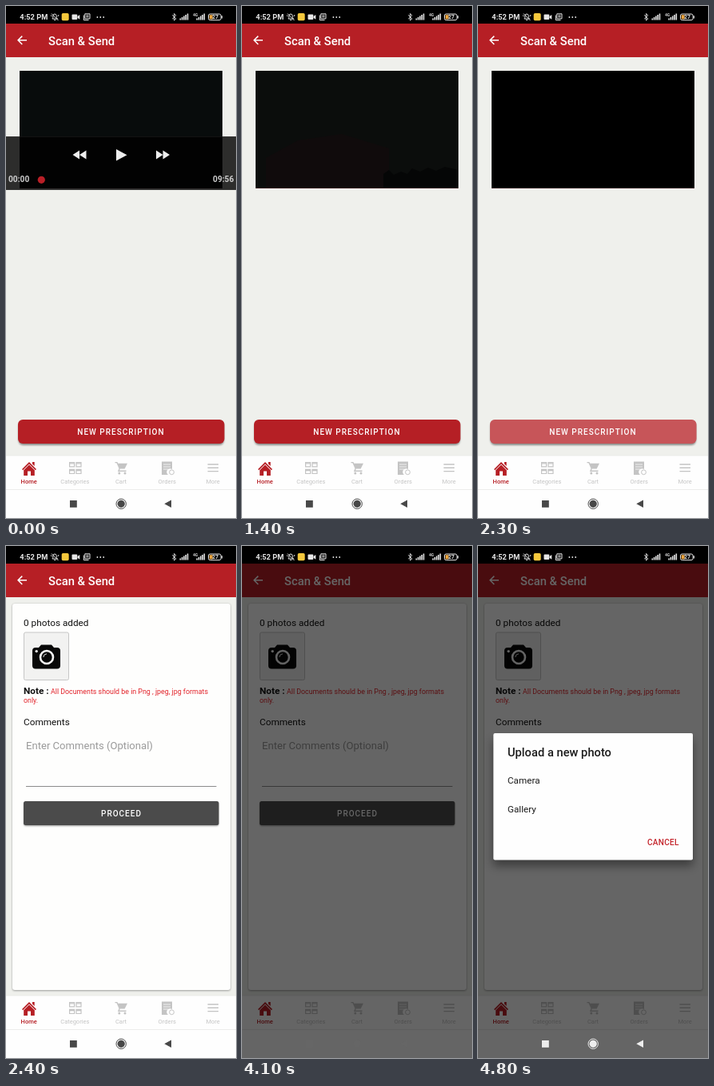
These frames come from a looping animation (288 by 640 pixels, 5000 ms). An HTML page:

```html
<!DOCTYPE html>
<html lang="en">
<head>
<meta charset="utf-8">
<title>Scan &amp; Send</title>
<style>
html, body { margin: 0; width: 100%; height: 100%; overflow: hidden; background: #eff0ec; }
svg { display: block; width: 288px; height: 640px; font-family: Roboto, Inter, sans-serif; }
.m { font-weight: 500; }
.b { font-weight: 700; }
.tab { font-size: 7.5px; text-anchor: middle; }
.line { fill: none; stroke: currentColor; }
</style>
</head>
<body>
<svg viewBox="0 0 288 640" xmlns="http://www.w3.org/2000/svg">
  <defs>
    <filter id="soft" x="-20%" y="-20%" width="140%" height="150%"><feGaussianBlur stdDeviation="1.3"/></filter>
    <filter id="deep" x="-20%" y="-20%" width="140%" height="150%"><feGaussianBlur stdDeviation="6"/></filter>
    <clipPath id="buttonShape"><rect x="15" y="517" width="258.5" height="30" rx="6"/></clipPath>
    <path id="skip" d="M0 0L8.5 5.5L0 11ZM8.5 0L17 5.5L8.5 11Z"/>
    <path id="signal" d="M0 8v-2h1.6v2zM2.3 8V4.5h1.6V8zM4.6 8V3h1.6v5zM6.9 8V1.5h1.6V8zM9.2 8V0h1.6v8z"/>
  </defs>

  <rect width="288" height="640" fill="#eff0ec"/>

  <g id="scanPage">
    <rect x="17" y="81" width="254" height="147" fill="#080c0c"/>
    <g id="scene">
      <rect x="17" y="81" width="254" height="147" fill="#0b0d0c"/>
      <path d="M30 227V190L70 168L125 160L184 178V227Z" fill="#150b0c" opacity=".6"/>
      <path d="M177 227V210L184 205L190 211L199 207L207 210L213 203L223 207L233 202L243 206L254 201L271 205V227Z" fill="#050606"/>
    </g>
    <rect id="blackout" x="17" y="81" width="254" height="147"/>
    <path d="M17 227.5H271" stroke="#321419"/>
    <g id="controls">
      <rect y="163" width="288" height="67" opacity=".81"/>
      <path d="M0 163.5H288M0 229.5H288" stroke="#555" stroke-width=".6" opacity=".35"/>
      <g fill="#eee">
        <use href="#skip" transform="translate(100.5 180.5) scale(-1 1)"/>
        <path d="M138 179L151.5 186.3L138 193.5Z"/>
        <use href="#skip" x="188" y="180.5"/>
      </g>
      <g class="b" font-size="10.2" fill="#ccc">
        <text x="3" y="220">00:00</text>
        <text x="285.3" y="220" text-anchor="end">09:56</text>
      </g>
      <circle cx="44.3" cy="217.3" r="4.6" fill="#b91f27"/>
    </g>
    <rect x="15.5" y="519" width="257.5" height="30" rx="6" opacity=".42" filter="url(#soft)"/>
    <rect x="15" y="517" width="258.5" height="30" rx="6" fill="#b51f25"/>
    <g clip-path="url(#buttonShape)"><circle id="ripple" cx="144" cy="532" fill="#fff" opacity=".24"/></g>
    <text class="m" x="89.3" y="536" font-size="10" letter-spacing="1" fill="#fff">NEW PRESCRIPTION</text>
  </g>

  <g id="formPage">
    <rect x="8" y="72.5" width="273" height="483.5" rx="3" opacity=".35" filter="url(#soft)"/>
    <rect x="8" y="72" width="273" height="483" rx="3" fill="#fefefd"/>
    <g font-size="11.8" fill="#111">
      <text x="22" y="100">0 photos added</text>
      <text class="b" x="22" y="185">Note :</text>
      <text x="22" y="223.5">Comments</text>
    </g>
    <rect x="22.5" y="108" width="56" height="59.5" rx="2" fill="#f2f2f1" stroke="#c6c6c6"/>
    <path d="M37 127H41L44 123.5H57L60 127H64Q68 127 68 131V149.5Q68 153.5 64 153.5H37Q33 153.5 33 149.5V131Q33 127 37 127Z" fill="#080808"/>
    <circle cx="51" cy="139" r="8" fill="#080808" stroke="#f5f5f5" stroke-width="2.6"/>
    <path d="M46.8 139A4.4 4.4 0 0 1 51 134.8" fill="none" stroke="#ddd"/>
    <circle cx="38.2" cy="131.6" r="1.7" fill="#f5f5f5"/>
    <g font-size="8.85" fill="#e2242b">
      <text x="56" y="185">All Documents should be in Png , jpeg, jpg formats</text>
      <text x="22" y="196.3">only.</text>
    </g>
    <text x="25" y="253.5" font-size="13.1" fill="#9a9a9a">Enter Comments (Optional)</text>
    <path d="M25 300.5H263.5" stroke="#8c8c8c"/>
    <rect x="22.5" y="320.5" width="243.5" height="29.5" rx="2.5" opacity=".4" filter="url(#soft)"/>
    <rect x="22" y="319" width="244.5" height="30" rx="2.5" fill="#4b4b4b"/>
    <text class="m" x="119" y="338" font-size="10" letter-spacing="1" fill="#fff">PROCEED</text>
  </g>

  <rect y="22" width="288" height="42" fill="#b61f25"/>
  <path d="M26 42.8H15.5M20.3 37.6L15.1 42.8L20.3 48" fill="none" stroke="#fff" stroke-width="1.5"/>
  <text class="m" x="53" y="49" font-size="14.8" fill="#fff">Scan &amp; Send</text>

  <rect y="562" width="288" height="78" fill="#fefefe"/>
  <path d="M0 562H288M0 604.5H288" stroke="#e6e6e4" stroke-width=".7"/>
  <g fill="#b61f25">
    <path d="M20 579L29 570L38 579L36.8 580.2L29 572.4L21.2 580.2Z"/>
    <path d="M33 570H35.7V575L33 572.5ZM22.2 580.3L29 573.5L35.8 580.3V587H31V581.5H27V587H22.2Z"/>
    <text class="tab m" x="28.7" y="597">Home</text>
  </g>
  <g fill="#c4c4c4" color="#c4c4c4">
    <path class="line" stroke-width="1.2" d="M79.6 570.6H85.6V575.8H79.6ZM88 570.6H94V575.8H88ZM79.6 579.3H85.6V584.5H79.6ZM88 579.3H94V584.5H88ZM79.6 572H85.6M88 572H94M79.6 580.7H85.6M88 580.7H94"/>
    <path class="line" stroke-width="1.4" d="M136.5 570.6H139L142.2 578L141 581.2H150.5"/>
    <path d="M139.8 571.8H152L148.6 578.6H142.6Z"/>
    <circle cx="141.8" cy="584" r="1.5"/><circle cx="149" cy="584" r="1.5"/>
    <path d="M195 569.5H208V579A4 4 0 0 0 203 586H195Z"/>
    <path d="M197 573H206M197 576H206M197 579H203" stroke="#f4f4f4" stroke-width=".9"/>
    <circle class="line" cx="207.5" cy="582.8" r="2.9" stroke-width="1"/>
    <path class="line" stroke-width="1.4" d="M252.5 573H266M252.5 577.3H266M252.5 581.6H266"/>
    <text class="tab" x="86.3" y="597">Categories</text>
    <text class="tab" x="144" y="597">Cart</text>
    <text class="tab" x="201.7" y="597">Orders</text>
    <text class="tab" x="259.2" y="597">More</text>
  </g>

  <rect id="dim" y="22" width="288" height="618" opacity=".6"/>

  <g id="navKeys">
    <rect x="80" y="618" width="8.8" height="8.8" fill="currentColor"/>
    <circle class="line" cx="144.2" cy="622.3" r="6.2"/>
    <circle cx="144.2" cy="622.3" r="4.6" fill="currentColor"/>
    <path d="M198.3 622.3L207 617.5V627.1Z" fill="currentColor"/>
  </g>

  <g id="dialog">
    <rect x="19" y="242" width="250" height="158" rx="2" opacity=".4" filter="url(#deep)"/>
    <rect x="19.3" y="234" width="249.7" height="158.5" rx="2" fill="#fefefe"/>
    <g fill="#1c1c1c">
      <text class="m" x="37" y="263.3" font-size="14.7">Upload a new photo</text>
      <text x="37" y="296.5" font-size="11.7">Camera</text>
      <text x="37" y="332.5" font-size="11.7">Gallery</text>
    </g>
    <text class="m" x="212" y="373.5" font-size="10.1" letter-spacing=".25" fill="#c4252c">CANCEL</text>
  </g>

  <rect width="288" height="22"/>
  <g fill="#e6e6e6" color="#e6e6e6">
    <text class="b" x="17.3" y="17" font-size="9.3">4:52 PM</text>
    <path class="line" stroke-width="1" d="M58 16H64.5L63.3 14.5V12.3Q63 10 61 10T58.8 12.3V14.5ZM60.2 17.6H62.2M57 9.5L65.5 18M57 13L56.4 11.5M65 13L66 11"/>
    <rect x="69.7" y="9" width="9" height="9.3" rx="1.8" fill="#f4c83c"/>
    <rect x="82.5" y="10.5" width="6.8" height="6.6" rx="1"/><path d="M89.5 13L92.3 11V16.7L89.5 14.7Z"/>
    <path class="line" stroke-width="1" d="M98.8 9.8H105V15.8H98.8ZM97.3 11.5V17.6H103.5M100.3 11.8H103.5M100.3 13.6H103.5"/>
    <circle cx="114.4" cy="14" r=".9"/><circle cx="118.3" cy="14" r=".9"/><circle cx="122.2" cy="14" r=".9"/>
    <path class="line" stroke-width=".9" d="M208 11.2L213 16L210.5 18V9.5L213 11.7L208 16.3"/>
    <use href="#signal" x="217.5" y="9.5"/>
    <use href="#signal" x="238.3" y="9.5"/>
    <text class="b" x="234.3" y="12.5" font-size="4.5">4G</text>
    <rect class="line" x="253.5" y="10" width="15.6" height="7.6" rx="2" stroke-width="1"/>
    <rect x="254.7" y="11.2" width="4" height="5.2" fill="#e9a23b"/>
    <path d="M269.8 12.2H271V15.5H269.8Z"/>
    <text class="b" x="258" y="16.4" font-size="7">27</text>
  </g>
</svg>
<script>
const LOOP = 5000, STEP = 100;
const el = id => document.getElementById(id);
const progress = (t, from, to) => Math.min(1, Math.max(0, (t - from) / (to - from)));
const easeOut = p => 1 - (1 - p) ** 2;
const fade = (id, opacity) => el(id).setAttribute('opacity', opacity);
const show = (id, visible) => el(id).setAttribute('visibility', visible ? 'visible' : 'hidden');
const gray = v => `rgb(${v},${v},${v})`;

function draw(t) {
  const form = t >= 2400, dimmed = t >= 4100;
  show('scanPage', !form);
  show('formPage', form);
  fade('controls', 1 - progress(t, 400, 800));
  fade('scene', progress(t, 400, 1000));
  fade('blackout', t >= 2300 ? 1 : 0);
  el('ripple').setAttribute('r', 140 * easeOut(progress(t, 2000, 2300)));

  show('dim', dimmed);
  const key = dimmed ? 102 + 136 * progress(t, 4100, 4400) : 72;
  el('navKeys').setAttribute('color', gray(Math.round(key)));

  const open = easeOut(progress(t, 4100, 4400));
  const scale = 0.9 + 0.1 * open;
  fade('dialog', open);
  el('dialog').setAttribute('transform', `translate(144 313) scale(${scale}) translate(-144 -313)`);
}

const start = performance.now();
function tick() {
  const t = (performance.now() - start) % LOOP;
  draw(Math.floor(t / STEP) * STEP);
  requestAnimationFrame(tick);
}
tick();
</script>
</body>
</html>
```
